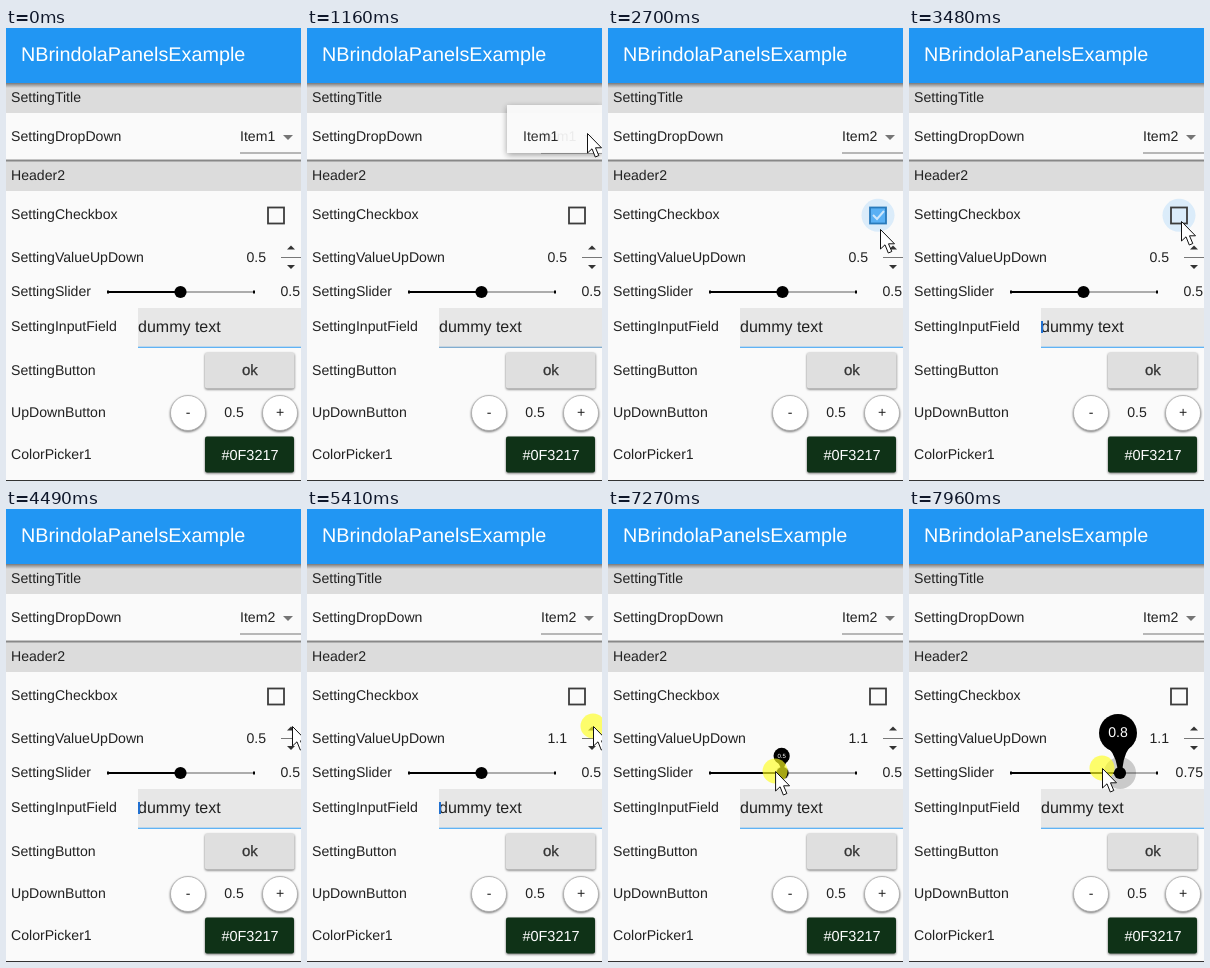
Recreate the animation shown at these times as an HTML page. Size 295 by 453 pixels, loop 8000 ms.

```html
<!DOCTYPE html>
<html lang="en">
<head>
<meta charset="utf-8">
<title>Settings panel</title>
<style>
html, body { margin: 0; width: 100%; height: 100%; overflow: hidden; background: #fafafa; }
svg { display: block; width: 295px; height: 453px; font: 14.1px "Liberation Sans", Arial, sans-serif; fill: #212121; text-rendering: geometricPrecision; }
.mid { text-anchor: middle; }
.end { text-anchor: end; }
.raised { filter: drop-shadow(0 1.5px 1px rgba(0, 0, 0, .55)); }
#pop { filter: drop-shadow(0 2px 3px rgba(0, 0, 0, .4)); }
</style>
</head>
<body>
<svg viewBox="0 0 295 453">
  <defs>
    <linearGradient id="fade" x2="0" y2="1">
      <stop stop-color="#000" stop-opacity=".45"/>
      <stop offset="1" stop-color="#000" stop-opacity="0"/>
    </linearGradient>
    <clipPath id="popClip"><rect class="popBox" y="77"/></clipPath>
    <clipPath id="rowClip"><rect x="200" y="133" width="95" height="48"/></clipPath>
  </defs>

  <rect width="295" height="453" fill="#fafafa"/>
  <path fill="#dcdcdc" d="M0 55H295V85H0ZM0 133H295V163H0Z"/>
  <rect y="131" width="295" height="1" fill="#c4c4c4"/>
  <rect y="132" width="295" height="1.5" fill="#888"/>
  <rect y="452" width="295" height="1" fill="#333"/>
  <rect y="55" width="295" height="5" fill="url(#fade)"/>
  <rect width="295" height="55" fill="#2196f3"/>
  <text x="15" y="33" font-size="19.8" fill="#fff">NBrindolaPanelsExample</text>

  <g id="labels"></g>

  <text id="choice" x="234" y="113.3"></text>
  <path fill="#757575" d="M277 107H287L282 112Z"/>
  <rect x="234" y="124.5" width="61" height="1" fill="#777"/>

  <circle id="halo" cx="270" cy="187.3" fill="#2196f3"/>
  <rect id="box" x="262" y="179.5" width="16" height="16" fill="#2196f3" stroke-width="1.8"/>
  <path id="tick" d="M265 187L269 191L276 183" fill="none" stroke="#fff" stroke-width="2"/>

  <text id="num" x="260" y="234" class="end"></text>
  <path fill="#333" d="M281 221.5H289L285 217.5ZM281 237H289L285 241Z"/>
  <rect x="275" y="229" width="20" height="1" fill="#777"/>

  <rect x="102" y="263.2" width="146" height="1.6" fill="#999"/>
  <rect id="track" x="102" y="263" height="2" fill="#000"/>
  <path fill="#000" d="M101 262.5H103V265.5H101ZM247 262.5H249V265.5H247Z"/>
  <text id="level" x="294" y="268.3" class="end"></text>

  <rect x="132" y="280" width="163" height="39" fill="#e7e7e7"/>
  <rect id="line" x="132" y="318.7" width="163" height="1.2"/>
  <text x="132" y="304" font-size="16">dummy text</text>
  <rect id="caret" x="132" y="293" width="2" height="12" fill="#2170d0"/>

  <rect class="raised" x="199" y="324.5" width="89.4" height="36" rx="2" fill="#dfdfdf"/>
  <text x="243.8" y="347" class="mid" font-size="15" fill="#333" stroke="#333" stroke-width=".3">ok</text>
  <g class="raised" fill="#fff" stroke="#aaa" stroke-width=".8">
    <circle cx="182" cy="385" r="17.5"/><circle cx="274" cy="385" r="17.5"/>
  </g>
  <text x="182" y="389" class="mid">-</text>
  <text x="228" y="389" class="mid">0.5</text>
  <text x="274" y="389" class="mid">+</text>
  <rect class="raised" x="199" y="408.5" width="89" height="36" rx="2" fill="#0f3217"/>
  <text x="244" y="431.5" class="mid" font-size="14.5" fill="#fff">#0F3217</text>

  <g id="slider">
    <circle id="grip" r="16" fill-opacity=".22"/>
    <g id="bubble" fill="#000">
      <circle cx="-2" cy="-40" r="19"/>
      <path d="M-19.5 -33Q-5 -22 -2.5 -5H2.5Q4 -22 15.5 -33Z"/>
      <text id="tip" x="-2" y="-36" class="mid" fill="#fff"></text>
    </g>
    <circle r="6.1" fill="#000"/>
  </g>

  <g id="pop">
    <rect class="popBox" y="77" fill="#fbfbfb"/>
    <g clip-path="url(#popClip)">
      <g clip-path="url(#rowClip)"><circle id="ripple" cx="253" cy="160" fill-opacity=".12"/></g>
      <text x="216" y="113">Item1</text>
      <text x="216" y="161">Item2</text>
      <text id="third" x="216" y="209">Item3</text>
    </g>
  </g>

  <g id="cursor">
    <circle id="press" r="12.5" fill="#ffff1e" fill-opacity=".65"/>
    <path d="M.5 .5V20L5 15.8L8.3 24L11.8 22.5L8.5 14.8H14.5Z" fill="#fff" stroke="#111"/>
  </g>
</svg>
<script>
const LOOP = 8000, STEP = 77.3;
const $ = id => document.getElementById(id);
const set = (id, attrs) => {
  for (const k in attrs) $(id).setAttribute(k, attrs[k]);
};
const show = (id, on) => set(id, { visibility: on ? 'visible' : 'hidden' });

const ramp = (t, from, to) => Math.min(1, Math.max(0, (t - from) / (to - from)));
const ease = p => p * p * (3 - 2 * p);
const lerp = (a, b, p) => a + (b - a) * p;
const mix = (a, b, p) => 'rgb(' + a.map((v, i) => Math.round(lerp(v, b[i], p))) + ')';

const BLUE = [33, 150, 243], DARK = [60, 60, 60], LINE = [80, 172, 245], IDLE = [160, 160, 160];

// Moments of the script
const OPEN = 1000, PICK = 1860, FOCUS = 2240, CHECK = 2550, UNCHECK = 3330, DOWN = 6270, GRAB = 7180;
const UPS = [0, 1, 2, 3].map(i => 4720 + 230 * i).concat(6740);
const CLICKS = [OPEN, PICK, CHECK, UNCHECK, DOWN, ...UPS];

// Pointer moves: start, end, x, y
const UP = [286, 217];
const MOVES = [
  [215, 230, 270, 182], [430, 540, 150, 282], [540, 850, 280, 105], [1240, 1690, 253, 165],
  [2240, 2480, 272, 201], [3090, 3160, 272, 193], [4030, 4490, ...UP], [5640, 5870, 278, 244],
  [6000, 6040, 278, 238], [6430, 6560, ...UP], [6820, 7100, 174, 262], [7200, 7480, 130, 262],
  [7570, 7960, 193, 259]
];

function pointer(t) {
  let x = 270, y = 328;
  for (const [from, to, tx, ty] of MOVES) {
    const p = ease(ramp(t, from, to));
    x = lerp(x, tx, p);
    y = lerp(y, ty, p);
  }
  return [x, y];
}

// The slider snaps to quarters while it is dragged.
const levelAt = t => t < GRAB ? .5 : Math.round((pointer(t)[0] - 98) / 146 * 4) / 4;

// The knob glides: mean level over the last 60 ms.
function glide(t) {
  let sum = 0;
  for (let i = 0; i < 12; i++) sum += levelAt(t - i * 5);
  return sum / 12;
}

$('labels').innerHTML = [
  ['SettingTitle', 74], ['SettingDropDown', 113], ['Header2', 152], ['SettingCheckbox', 191],
  ['SettingValueUpDown', 234], ['SettingSlider', 268], ['SettingInputField', 303],
  ['SettingButton', 347], ['UpDownButton', 389], ['ColorPicker1', 431]
].map(([s, y]) => `<text x="5" y="${y + .3}">${s}</text>`).join('');

function drawPopup(t) {
  const x = lerp(234, 200, ramp(t, OPEN, OPEN + 155));
  const height = lerp(48, 160, ease(ramp(t, OPEN + 200, OPEN + 550)));
  for (const r of document.querySelectorAll('.popBox')) {
    r.setAttribute('x', x);
    r.setAttribute('width', 295 - x);
    r.setAttribute('height', height);
  }
  const gone = ramp(t, PICK + 70, PICK + 230);
  set('pop', { opacity: .93 * ramp(t, OPEN, OPEN + 160) * (1 - gone * .66) * (gone < 1) });
  set('third', { opacity: 1 - gone });
  set('ripple', { r: 42 * ramp(t, PICK, PICK + 154) });
  $('choice').textContent = gone ? 'Item2' : 'Item1';
}

function drawCheckbox(t) {
  const on = ramp(t, CHECK, CHECK + 230) - ramp(t, UNCHECK, UNCHECK + 140);
  set('box', { 'fill-opacity': on, stroke: mix(DARK, BLUE, on) });
  set('tick', { opacity: on });
  const age = t - (t < UNCHECK ? CHECK : UNCHECK);
  set('halo', {
    r: 16.5 * ease(ramp(age, 0, 150)),
    opacity: .14 * (1 - ramp(age, 170, 480))
  });
}

function drawSlider(t) {
  const level = levelAt(t), x = 146 * glide(t);
  const size = ease(ramp(t, GRAB, GRAB + 200));
  set('track', { width: x });
  set('slider', { transform: `translate(${101.5 + x} 264)` });
  set('grip', { r: 16 * size });
  set('bubble', { transform: `scale(${size})` });
  $('level').textContent = level;
  $('tip').textContent = (level + .001).toFixed(1);
}

function drawCount(t) {
  const ups = UPS.filter(u => u <= t).length;
  $('num').textContent = (.501 + .15 * (ups - (t >= DOWN))).toFixed(1);
}

function drawInput(t) {
  const idle = ramp(t, OPEN, OPEN + 350) - ramp(t, FOCUS, FOCUS + 250);
  set('line', { fill: mix(LINE, IDLE, idle) });
  show('caret', t > FOCUS && t < UPS[4] && (t - 760) % 1120 < 560);
}

function drawPointer(t) {
  show('cursor', t >= 150);
  show('press', t >= GRAB || CLICKS.some(c => t >= c && t < c + 80));
  set('cursor', { transform: `translate(${pointer(t).join(' ')})` });
}

// The screen refreshes in even steps of about 13 per second.
const start = performance.now();
function tick() {
  const now = (performance.now() - start) % LOOP;
  const t = Math.floor((now + 12) / STEP) * STEP + 4;
  [drawPopup, drawCheckbox, drawSlider, drawCount, drawInput, drawPointer].forEach(draw => draw(t));
  requestAnimationFrame(tick);
}
tick();
</script>
</body>
</html>
```
